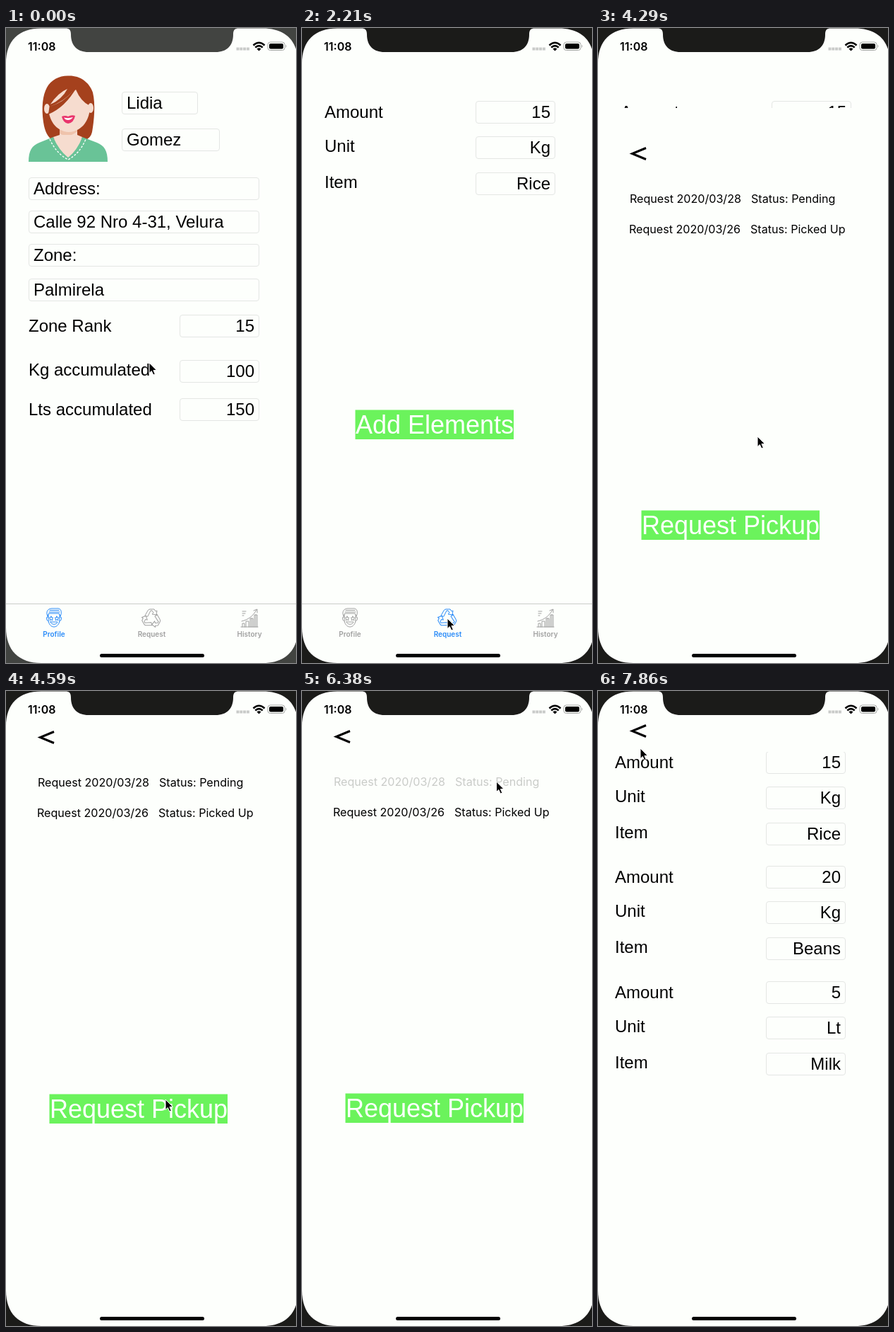
An HTML page that plays this animation: 411 by 897 pixels, repeating every 8 s.

```html
<!DOCTYPE html>
<html lang="en">
<head>
<meta charset="utf-8">
<title>Recycling app</title>
<style>
html, body { margin: 0; width: 100%; height: 100%; overflow: hidden; background: #fdfffc; }
svg { display: block; width: 411px; height: 897px; }
text { font: 24px "Liberation Sans", Arial, sans-serif; fill: #000; }
.big { font-size: 36px; fill: #fff; }
.row { font: 16.1px Inter, sans-serif; }
.time { font: 600 16px Inter, sans-serif; }
.tab text { font: 600 10px Inter, sans-serif; fill: currentColor; }
.tab { color: #a0a0a0; }
.tab.on { color: #2a8bf8; }
.icon { fill: none; stroke: currentColor; stroke-width: 1; stroke-linejoin: round; stroke-linecap: round; }
.field { fill: none; stroke: #e4e6e4; }
.paper { fill: #fdfffc; }
.back { fill: none; stroke: #000; stroke-width: 3; stroke-linejoin: miter; }
</style>
</head>
<body>
<svg viewBox="0 0 411 897">
  <defs>
    <clipPath id="scroll"><rect y="86" width="411" height="811"/></clipPath>
    <path id="loop" d="M-9-4-5-11Q-4-13-2-13H4L6-10 8-11 7-5 1-6 3-8 1-11-1-11-5-3Z"/>
    <path id="star" d="M0-3 .9-1 3-.8 1.4.7 1.9 2.8 0 1.7-1.9 2.8-1.4.7-3-.8-.9-1Z"/>
  </defs>
  <rect class="paper" width="411" height="897"/>

  <g id="profile">
    <g id="avatar">
      <path fill="#a5411d" d="M89 67.500C104 67 118 76 123 91C127 108 125 130 122 147Q120 156 112 158H66Q56 153 53 133C50 112 52 95 58 84C64 73 76 67 89 67.500Z"/>
      <path fill="#f6dccf" d="M76 138H101V154L113 159 89 189 63 159 76 154Z"/>
      <path fill="#efc3ac" d="M76 141Q88 150 101 141V146Q88 157 76 149Z"/>
      <ellipse fill="#f6dccf" cx="58" cy="114" rx="4" ry="7"/>
      <ellipse fill="#f6dccf" cx="120" cy="113" rx="4" ry="7"/>
      <path fill="#f6dccf" d="M60 111Q80 104 99 87Q106 104 119 110C119 129 109 146 89 147C70 146 60 129 60 111Z"/>
      <path fill="#f6dccf" d="M87 86Q74 91 62 109Q80 100 87 86Z"/>
      <path fill="#a5411d" d="M100 84Q86 100 62 108L60 122Q84 112 100 84Z"/>
      <path fill="#f6dccf" d="M95 89Q82 104 62 111Q82 105 95 89Z"/>
      <path fill="#e9346c" d="M79 125Q84 123 88 125Q93 122 98 124Q96 134 88 135Q81 134 79 125Z"/>
      <path fill="#fff" d="M82 126.500Q89 128 95 126Q92 130 88 130Q84 130 82 126.500Z"/>
      <path fill="#69c397" d="M32 189C32 173 37 166 47 162L67 154Q75 173 88 183Q101 173 108 154L129 162C139 166 144 173 144 189Z"/>
      <path fill="#f6dccf" d="M67 154 76 151H101L108 154Q102 171 88 181Q74 171 67 154Z"/>
      <path fill="none" stroke="#fff" stroke-width="1.300" stroke-dasharray="3 2" d="M62 157Q71 177 88 186Q105 177 113 157"/>
    </g>
  </g>
  <g id="request"></g>
  <g id="tabs">
    <path stroke="#cbcdca" d="M0 813.500H411"/>
    <g class="tab">
      <g class="icon" transform="translate(68 833)">
        <path d="M-8-4V3C-8 9-4 13 0 13S8 9 8 3V-4M-9-2C-12-8-9-13-3-13H4C10-14 12-8 9-2L7-6H-7ZM-7-8H8M-6-10.500H7M-8-1H-10Q-12 3-8 5M8-1H10Q12 3 8 5M-5 6H5C4 10.500-4 10.500-5 6Z"/>
        <use href="#star" x="-4" y="1"/><use href="#star" x="4" y="1"/>
      </g>
      <text x="68" y="859.500" text-anchor="middle">Profile</text>
    </g>
    <g class="tab">
      <g class="icon" transform="translate(206 834)">
        <use href="#loop"/><use href="#loop" transform="rotate(120)"/><use href="#loop" transform="rotate(240)"/>
      </g>
      <text x="206.500" y="859.500" text-anchor="middle">Request</text>
    </g>
    <g class="tab">
      <path class="icon" transform="translate(345 833)" d="M-12 13H12M-10 13V8H-7V13M-5 13V5H-1V13M1 13V1H5V13M7 13V-4H11V13M9 13V-4M3 13V1M-11 5C-2 3 5-2 10-11M6-10 11-12 11-7M-10-9H-5M-10-6H-6M-10-3H-8"/>
      <text x="345" y="859.500" text-anchor="middle">History</text>
    </g>
  </g>
  <g id="list">
    <rect class="paper" width="411" height="897"/>
    <path class="back" d="M68 56.500 48.500 64.500 68 72.500"/>
  </g>
  <g id="detail">
    <rect class="paper" width="411" height="897"/>
    <path class="back" d="M68 48.500 48.500 56.500 68 64.500"/>
    <g id="items" clip-path="url(#scroll)"></g>
  </g>

  <path id="bezel" fill-rule="evenodd" d="M-2-2H416V899H-2ZM0 50C0 18 18 .500 50 .500H84C90 .500 92 3 92 9C92 25 101 34 117 34H297C313 34 322 25 322 9C322 3 324 .500 330 .500H364C396 .500 414 18 414 50V847C414 879 396 897 364 897H50C18 897 0 879 0 847Z"/>
  <g id="status">
    <text class="time" x="31" y="31.500">11:08</text>
    <path stroke="#c9cbc9" stroke-width="4" stroke-dasharray="4 .8" d="M326.500 29.500H345"/>
    <g fill="none" stroke="#000" stroke-width="2.500">
      <path d="M350.500 24.500Q358.500 17 366.500 24.500M353.300 27.500Q358.500 22.700 363.700 27.500"/>
      <path fill="#000" stroke="none" d="M355.500 29.500Q358.500 26.800 361.500 29.500L358.500 32.500Z"/>
    </g>
    <rect x="371" y="20" width="24" height="11.500" rx="3.500" fill="none" stroke="#a4a6a4"/>
    <rect x="373" y="22" width="20" height="7.500" rx="2"/>
    <path fill="#a4a6a4" d="M396.500 23.500Q398.500 25.500 396.500 28Z"/>
  </g>
  <rect x="133" y="884" width="148" height="5" rx="2.500"/>
  <path id="cursor" stroke="#fff" stroke-width="1" d="M0 0V14.500L3.300 11.500 5.800 17 8.300 16 5.900 10.500H10.500Z"/>
</svg>
<script>
const $ = id => document.getElementById(id);
const add = (id, html) => $(id).insertAdjacentHTML('beforeend', html);
const text = (x, y, s, attrs = '') => `<text x="${x}" y="${y}" ${attrs}>${s}</text>`;
const box = (x, y, w) => `<rect class="field" x="${x + .5}" y="${y + .5}" width="${w - 1}" height="31" rx="3.5"/>`;
const input = (x, y, w, s) => box(x, y, w) + text(x + 7, y + 24, s);
const value = (x, y, label, s, drop = 24) =>
  text(x, y + drop, label) + box(x + 214, y, 113) + text(x + 320, y + 24, s, 'text-anchor="end"');
const item = (x, y, amount, unit, name) =>
  value(x, y, 'Amount', amount) + value(x, y + 50, 'Unit', unit, 22) + value(x, y + 101, 'Item', name, 22);
const button = (x, y, w, s) =>
  `<rect x="${x}" y="${y}" width="${w}" height="41.5" fill="#6bf35c"/>` + text(x + .5, y + 33.5, s, 'class="big"');
const entry = (id, x, y, date, state) =>
  `<g id="${id}">${text(x, y, 'Request ' + date, 'class="row"')}${text(x + 172, y, 'Status: ' + state, 'class="row"')}</g>`;

add('profile',
  input(164, 90, 108, 'Lidia') + input(164, 142, 139, 'Gomez') +
  input(32, 211, 327, 'Address:') + input(32, 258, 327, 'Calle 92 Nro 4-31, Velura') +
  input(32, 305, 327, 'Zone:') + input(32, 354, 327, 'Palmirela') +
  value(32, 405, 'Zone Rank', 15) + value(32, 469, 'Kg accumulated', 100, 22) +
  value(32, 523, 'Lts accumulated', 150));
add('request', item(32, 103, 15, 'Kg', 'Rice') + button(75.5, 539.5, 224.5, 'Add Elements'));
add('list',
  entry('pending', 45, 133.5, '2020/03/28', 'Pending') +
  entry('picked', 44, 176.5, '2020/03/26', 'Picked Up') +
  button(61.5, 568.5, 252.500, 'Request Pickup'));
add('items', item(24, 85, 15, 'Kg', 'Rice') + item(24, 247, 20, 'Kg', 'Beans') + item(24, 410, 5, 'Lt', 'Milk'));

const LOOP = 8000, TICK = 148.2;
// Pointer path: tick, x, y
const path = [
  [1, 203, 473], [2, 199, 500], [4, 179, 660], [5, 188, 765], [6, 204, 826],
  [7, 204, 826], [8, 205, 830], [9, 206, 834], [15, 206, 834], [18, 203, 795],
  [21, 214, 620], [22, 223, 581], [23, 226, 577], [31, 226, 577], [32, 245, 520],
  [33, 287, 380], [34, 289, 240], [35, 281, 149], [36, 275.5, 128], [50, 275.5, 128],
  [51, 205, 112], [52, 85, 91], [53, 60, 81]
];

function pointer(n) {
  const i = path.findIndex(p => p[0] >= n);
  if (i < 1) return i ? path[path.length - 1].slice(1) : path[0].slice(1);
  const [a, b] = [path[i - 1], path[i]], k = (n - a[0]) / (b[0] - a[0]);
  return [1, 2].map(j => a[j] + (b[j] - a[j]) * k);
}

// Critically damped spring that lifts a page from the bottom edge
function slide(id, ms) {
  const u = Math.max(0, ms) * .01826;
  $(id).style.display = ms > 0 ? '' : 'none';
  $(id).setAttribute('transform', `translate(0 ${Math.round(897 * (1 + u) * Math.exp(-u))})`);
}

const tabs = document.querySelectorAll('.tab');

function draw(now) {
  // The screen refreshes in even ticks
  const n = Math.floor((now % LOOP + 14) / TICK), t = n * TICK;
  const asking = n >= 15;
  $('profile').style.display = asking ? 'none' : '';
  $('request').style.display = asking ? '' : 'none';
  tabs.forEach((tab, i) => tab.classList.toggle('on', i === +asking));
  $('bezel').setAttribute('fill', n < 13 ? '#424441' : '#1b1b19');
  $('pending').setAttribute('opacity', n === 43 ? .2 : n === 44 ? .6 : 1);
  slide('list', t - 4101);
  slide('detail', t - 6513);
  $('cursor').setAttribute('transform', `translate(${pointer(n)})`);
}

const start = performance.now();
(function frame() {
  draw(performance.now() - start);
  requestAnimationFrame(frame);
})();
</script>
</body>
</html>
```
